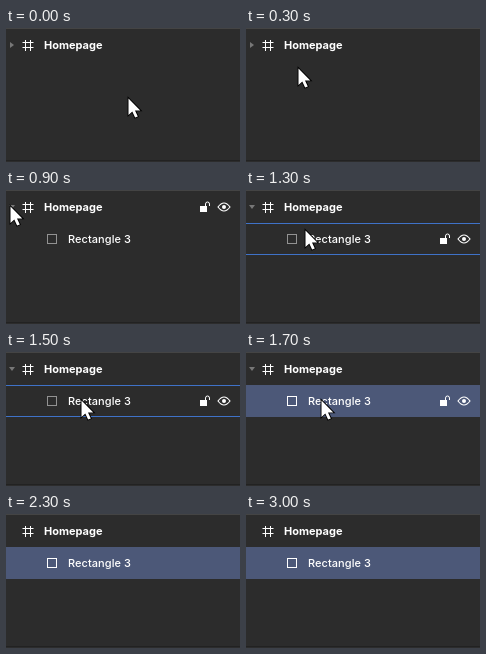
An HTML page for the animation above (3.1 s loop, 234 px wide and 134 px high).

```html
<!DOCTYPE html>
<html lang="en">
<head>
<meta charset="utf-8">
<title>Layers panel</title>
<style>
  html, body { margin: 0; width: 100%; height: 100%; overflow: hidden; background: #2c2c2c; }
  svg { display: block; width: 234px; height: 134px; }
  text { font: 500 11px Inter, sans-serif; letter-spacing: .055px; fill: #fff; }
  .bold { font-weight: 700; letter-spacing: 0; }
  .line { fill: none; stroke: #fff; }
  #edges { fill: #3f72c8; }
  #cursor { fill: #fff; stroke: #000; stroke-width: 1.8; paint-order: stroke; }
</style>
</head>
<body>
<svg viewBox="0 0 234 134">
  <rect width="234" height="134" fill="#2c2c2c"/>
  <rect width="234" height="1" fill="#444"/>
  <rect y="132" width="234" height="1" fill="#222"/>
  <rect id="selection" y="33" width="234" height="32" fill="#4c5878"/>
  <g id="edges">
    <rect y="1" width="234" height="1"/>
    <rect y="32" width="234" height="1"/>
  </g>

  <path id="arrow" fill="#777"/>
  <path class="line" d="M19.5 12v11M24.5 12v11M16.5 14.5h11M16.5 19.5h11"/>
  <text class="bold" x="38" y="21">Homepage</text>

  <g id="child">
    <rect id="box" class="line" x="41.5" y="44.5" width="9" height="9"/>
    <text x="62" y="53">Rectangle 3</text>
  </g>

  <g id="tools">
    <rect x="194" y="16" width="7" height="6" fill="#fff"/>
    <path class="line" d="M199.5 16v-2a2 2 0 0 1 4 0v2"/>
    <path class="line" stroke-width="1.2" d="M212 17q6-8 12 0q-6 8-12 0z"/>
    <circle cx="218" cy="17" r="2" fill="#fff"/>
  </g>

  <path id="cursor" d="M.5 .5v16.5l3.8-3.6 2.8 6.2 2.7-1.2-2.8-6h5.3z"/>
</svg>
<script>
const LOOP = 3100, STEP = 100;
const $ = id => document.getElementById(id);
const show = (id, on) => $(id).style.display = on ? '' : 'none';
const move = (id, x, y) => $(id).setAttribute('transform', `translate(${x} ${y})`);

// Pointer path: time, x, y
const path = [
  [0, 122, 70], [100, 115, 67], [400, 20, 27], [600, 1, 21], [800, 4, 16],
  [1100, 4, 16], [1300, 59, 40], [1500, 75, 48], [2000, 75, 48],
  [2100, 83, 72], [2200, 96, 112], [2300, 110, 140], [LOOP, 110, 140]
];

function pointer(t) {
  const i = path.findIndex(p => p[0] > t);
  const [t0, x0, y0] = path[i - 1], [t1, x1, y1] = path[i];
  const k = (t - t0) / (t1 - t0);
  return [Math.round(x0 + (x1 - x0) * k), Math.round(y0 + (y1 - y0) * k)];
}

function draw(t) {
  const [x, y] = pointer(t);
  const open = t >= 800, selected = t >= 1700;
  const inTop = y < 33, inChild = open && !inTop && y < 65;
  const rowY = inChild ? 32 : 0;

  move('cursor', x, y);
  move('tools', 0, rowY);
  move('edges', 0, rowY);
  show('tools', inTop || inChild);
  show('edges', (inTop && !open) || (inChild && !selected));
  show('child', open);
  show('selection', selected);
  show('arrow', t < 2300);
  $('arrow').setAttribute('d', open ? 'M3 15h6l-3 4z' : 'M4 14v6l4-3z');
  $('box').style.stroke = selected ? '#fff' : '#929292';
}

function tick() {
  const t = performance.now() % LOOP;
  draw(Math.floor(t / STEP) * STEP);
  requestAnimationFrame(tick);
}
tick();
</script>
</body>
</html>
```
